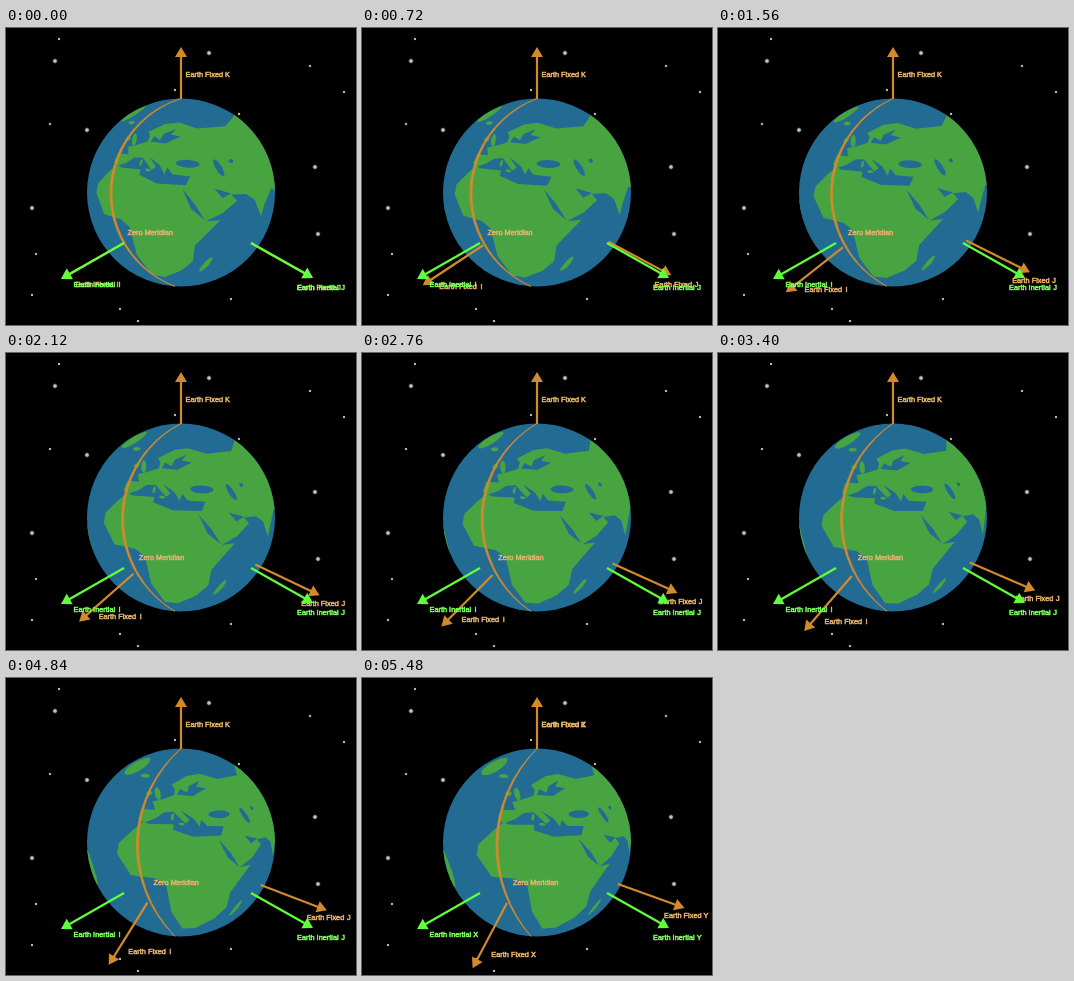
Write an HTML page with a canvas that moves like this. It is 350 px wide and 297 px high and loops after 5520 ms.

```html
<!DOCTYPE html>
<html lang="en">
<head>
<meta charset="utf-8">
<title>Earth fixed and inertial axes</title>
<style>
html, body { margin: 0; width: 100%; height: 100%; overflow: hidden; background: #000; }
canvas { display: block; width: 350px; height: 297px; }
</style>
</head>
<body>
<canvas></canvas>
<script>
const W = 350, H = 297, LOOP = 5520, STEP = 40, LAST = LOOP / STEP - 1;
const CX = 175, CY = 164.5, R = 94;
const SEA = '#226c94', LAND = '#48a441', ORANGE = '#d28a2c', GREEN = '#60ff3c';
const PEACH = '#e3b06c', LIME = '#7dff5c';
const canvas = document.querySelector('canvas');
const dpr = window.devicePixelRatio || 1;
canvas.width = W * dpr;
canvas.height = H * dpr;
const c = canvas.getContext('2d');
c.scale(dpr, dpr);

const rad = deg => deg * Math.PI / 180;
const mix = (a, b, p) => a + (b - a) * p;
const points = text => text.split(' ').map(pair => pair.split(',').map(Number));

// An oval of given half width and height, leaning to the east
function oval(lon, lat, w, h, lean = 0) {
  return Array.from({ length: 12 }, (_, i) => {
    const a = i * Math.PI / 6;
    return [lon + w * Math.cos(a) + lean * Math.sin(a), lat + h * Math.sin(a)];
  });
}

// Key points of the coasts as longitude,latitude
const mainland = points('-9,37 -9,43 -1,44 -4,48.5 2,51 8,54 8,58 5,61 15,68.5 26,71 41,67 68,69 104,77 178,69 140,45 108,10 92,22 80,14 77.5,8 72,20 66,25 57,26 60,22 52,16 44,12 51,12 40,-3 40,-15 35,-24 26,-34 18.5,-34 12,-16 9,3 4,6 -8,4.5 -17,14.5 -17,21 -10,31 -6,36');
const lands = [
  mainland,
  oval(-2.5, 54, 2, 4, -2),
  oval(-8, 53.4, 2, 1.7),
  oval(-19, 65, 4.5, 1.6),
  oval(47, -19, 1.8, 6.5, 2),
  oval(-42, 72, 14, 10),
  oval(-49, -11, 13, 13)
];
const seas = [
  points('-5,36 0,39 4,43 9,44 16,38 18,40 13,45 20,41 23,36.5 24,40.5 27,37 36,36.5 34,31.5 20,31 10,34 10,37 -2,35.5'),
  points('10,54.5 20,54.5 29,60 22,61 25,65.5 17,61 16,56.5 11,58.5'),
  points('32.5,29.5 39,21 43.5,12.5 37,19'),
  points('48,30 57,26.5 52,24.5'),
  oval(34.5, 43.5, 6.5, 2.3),
  oval(51.5, 41.5, 2, 5, -2),
  oval(60, 45, 1.5, 1.3)
];
const isles = [oval(9, 41, 0.8, 2), oval(14, 37.5, 1.6, 0.8)];

const bright = points('49,33 26,180 203,25 309,139 312,206 81,102');
const faint = points('53,11 44,96 30,226 26,267 114,281 132,293 225,271 169,62 233,86 304,38 338,64');

// Close perspective view; points past the horizon move out beyond the rim
const DIST = 3, TILT = rad(22), ROLL = rad(4), SQUASH = 0.8;
const ZOOM = Math.sqrt(DIST * DIST - 1);
function project(lon, lat, centre) {
  const a = rad(lon - centre), b = rad(lat * SQUASH);
  const x = Math.cos(b) * Math.sin(a), front = Math.cos(b) * Math.cos(a);
  const y = front * Math.sin(TILT) - Math.sin(b) * Math.cos(TILT);
  const z = front * Math.cos(TILT) + Math.sin(b) * Math.sin(TILT);
  const hidden = 1 / DIST - z;
  const k = R * (hidden > 0 ? (1 + hidden) / Math.hypot(x, y) : ZOOM / (DIST - z));
  return [
    CX + k * (x * Math.cos(ROLL) - y * Math.sin(ROLL)),
    CY + k * (x * Math.sin(ROLL) + y * Math.cos(ROLL))
  ];
}

function shape(outline, centre, colour) {
  c.beginPath();
  for (const [lon, lat] of outline) c.lineTo(...project(lon, lat, centre));
  c.closePath();
  c.fillStyle = colour;
  c.fill();
}

function disc(x, y, r, colour) {
  c.beginPath();
  c.arc(x, y, r, 0, 7);
  c.fillStyle = colour;
  c.fill();
}

function star(x, y, r) {
  const glow = c.createRadialGradient(x, y, 0, x, y, r);
  glow.addColorStop(0, '#ddd');
  glow.addColorStop(0.45, '#aaa');
  glow.addColorStop(1, '#0000');
  disc(x, y, r, glow);
}

function globe(centre) {
  disc(CX, CY, R, SEA);
  c.save();
  c.clip();
  lands.forEach(land => shape(land, centre, LAND));
  seas.forEach(sea => shape(sea, centre, SEA));
  isles.forEach(isle => shape(isle, centre, LAND));
  c.restore();
}

// Circular arc bulging left from a vertical chord of half height R
function bow(bulge, back) {
  const r = (R * R + bulge * bulge) / (2 * bulge), a = Math.asin(R / r);
  const ends = [Math.PI - a, Math.PI + a];
  if (back) ends.reverse();
  c.arc(r - bulge, 0, r, ...ends, back);
}

function meridian(bulge) {
  c.save();
  c.translate(172, CY);
  c.rotate(rad(1.8));
  c.beginPath();
  bow(bulge + 1, false);
  bow(bulge - 1, true);
  c.closePath();
  c.fillStyle = c.strokeStyle = ORANGE;
  c.lineWidth = 0.7;
  c.fill();
  c.stroke();
  c.restore();
}

function arrow(x, y, tipX, tipY, colour) {
  const len = Math.hypot(tipX - x, tipY - y);
  c.save();
  c.translate(tipX, tipY);
  c.rotate(Math.atan2(tipY - y, tipX - x));
  c.fillStyle = colour;
  c.fillRect(-len, -1.1, len - 8, 2.2);
  c.beginPath();
  c.moveTo(0, 0);
  c.lineTo(-10, -6);
  c.lineTo(-10, 6);
  c.fill();
  c.restore();
}

function write(text, x, y, colour) {
  c.font = '7.35px "Liberation Sans", Arial, sans-serif';
  c.textBaseline = 'alphabetic';
  c.fillStyle = c.strokeStyle = colour;
  c.lineWidth = 0.55;
  c.fillText(text, x, y + 2.6);
  c.strokeText(text, x, y + 2.6);
  return c.measureText(text).width;
}

// The axis letter is centred in a slot as wide as a capital X
function label(text, letter, x, y, colour) {
  const slot = x + write(text + ' ', x, y, colour);
  const spare = c.measureText('X').width - c.measureText(letter).width;
  write(letter, slot + spare / 2, y, colour);
}

function draw(p) {
  const end = p === 1;
  const [first, second] = end ? 'XY' : 'IJ';
  c.fillStyle = '#000';
  c.fillRect(0, 0, W, H);
  bright.forEach(([x, y]) => star(x, y, 3.2));
  faint.forEach(([x, y]) => star(x, y, 1.9));
  globe(mix(32, 12, p));
  meridian(mix(67, 37, p));

  arrow(175, 71, 175, 19, ORANGE);
  label('Earth Fixed', 'K', 179.5, 46.5, PEACH);
  if (end) label('Earth Fixed', 'Z', 179.5, 46.5, PEACH);

  const turn = rad(mix(59.5, 27.6, p));
  arrow(118 + 23 * p + 4 * p * p, 215 + 18 * p - 8 * p * p,
    175 - 139 * Math.sin(turn), 198 + 104 * Math.cos(turn), ORANGE);
  arrow(mix(245, 256, p), mix(215, 206, p),
    307 + 18 * p - 2.5 * p * p, mix(250, 230, p), ORANGE);
  write('Zero Meridian', mix(121.5, 151, p), 204, PEACH);
  label('Earth Fixed', first, mix(69.5, 129.3, p), mix(256, 276, p), PEACH);
  label('Earth Fixed', second, mix(291, 302, p), mix(259, 237, p), PEACH);

  arrow(118, 215, 55, 251, GREEN);
  arrow(245, 215, 307, 250, GREEN);
  label('Earth Inertial', first, 67.5, 256, LIME);
  label('Earth Inertial', second, 291, 259, LIME);
}

const start = performance.now();
function tick() {
  const t = (performance.now() - start) % LOOP;
  draw(Math.floor(t / STEP) / LAST);
  requestAnimationFrame(tick);
}
tick();
</script>
</body>
</html>
```
